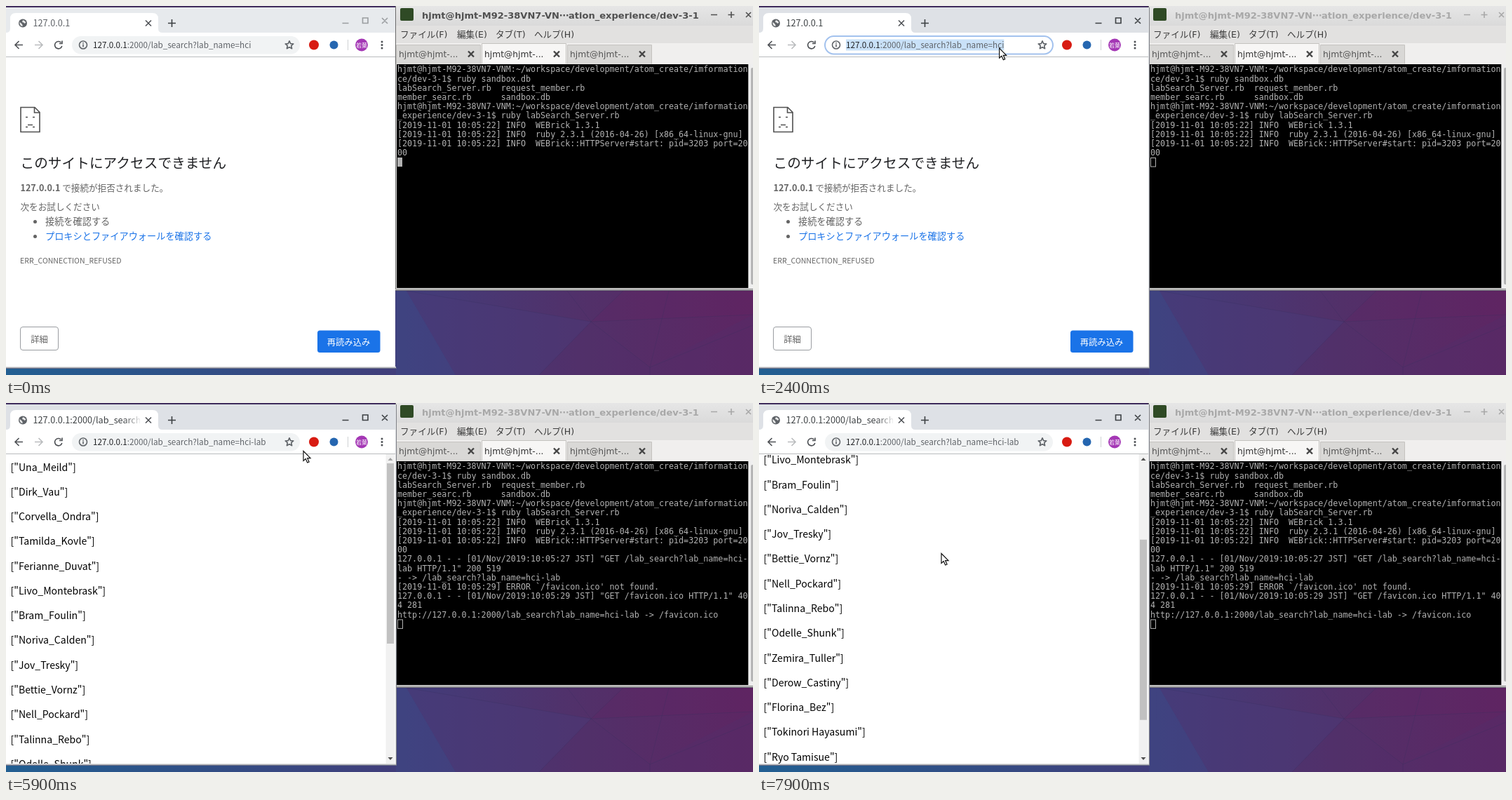
Recreate the animation shown at these times as an HTML page. Size 1065x526 px, loop 8000 ms.

```html
<!DOCTYPE html>
<html lang="ja">
<head>
<meta charset="utf-8">
<title>Lab search</title>
<style>
  html, body { margin: 0; width: 100%; height: 100%; overflow: hidden; }
  svg { display: block; width: 100vw; height: 100vh; }
  text { white-space: pre; }
  .ui { font-family: "Noto Sans CJK JP", "Noto Sans", sans-serif; }
  .gtk { font: 12.6px "DejaVu Sans", "Noto Sans CJK JP", sans-serif; }
  .mono { font: 11.7px "DejaVu Sans Mono", monospace; fill: #b2b2b2; }
  .url { font-size: 11.73px; fill: #5f6368; }
  .host { fill: #202124; }
  .list { font-size: 14.08px; fill: #000; }
  .line { fill: none; stroke-width: 1.6; }
  .mid { text-anchor: middle; }
</style>
</head>
<body>
<svg viewBox="0 0 1065 526" preserveAspectRatio="none">
  <defs>
    <linearGradient id="sky">
      <stop offset="0" stop-color="#225f92"/><stop offset=".25" stop-color="#304f86"/>
      <stop offset=".55" stop-color="#433c79"/><stop offset=".78" stop-color="#523069"/>
      <stop offset="1" stop-color="#5d2663"/>
    </linearGradient>
    <linearGradient id="titleBar" x2="0" y2="1">
      <stop offset="0" stop-color="#e6e6e6"/><stop offset="1" stop-color="#dadada"/>
    </linearGradient>
    <linearGradient id="fade">
      <stop offset="0" stop-color="#fff" stop-opacity="0"/><stop offset="1" stop-color="#fff"/>
    </linearGradient>
    <filter id="shadow" x="-10%" y="-10%" width="120%" height="140%">
      <feDropShadow dx="0" dy="3" stdDeviation="4" flood-opacity=".35"/>
    </filter>
    <clipPath id="pageClip"><rect y="73" width="541" height="441"/></clipPath>
    <clipPath id="tabClip"><rect x="38" y="12" width="153" height="24"/></clipPath>
    <g id="globe">
      <circle r="6" fill="#5f6368"/>
      <path d="M-4.5-1.5Q-2 0-1 1.5T-.5 4.6Q-4 4-4.6 0ZM0-4.6Q3-4 4.4-1L2.5.5 1-1-1-1.5Z" fill="#fff" opacity=".85"/>
    </g>
    <path id="cross" d="M-4-4L4 4M4-4L-4 4"/>
  </defs>

  <g id="desktop">
    <rect width="1065" height="526" fill="url(#sky)"/>
    <rect width="1065" height="2" fill="#42305f"/>
    <path d="M556 406H571L641 526H556Z" fill="#3c4a88" opacity=".45"/>
    <path d="M571 406L641 526H760L834 450Z" fill="#4b3a78" opacity=".5"/>
    <path d="M834 450L880 406H1065V440Z" fill="#65235f" opacity=".25"/>
    <path d="M834 450L918 515 1065 440V526H760Z" fill="#512f6c" opacity=".3"/>
    <path d="M571 406L834 450 1065 440M834 450L760 526M834 450L918 515 1065 455M834 450L880 406M918 515L945 406M834 450L800 406M918 515V526" class="line" style="stroke:#38305f;stroke-width:1;opacity:.28"/>
  </g>

  <g id="terminal" class="gtk">
    <rect x="555" width="510" height="406" fill="#e9e8e7"/>
    <rect x="555" width="510" height="28" fill="url(#titleBar)"/>
    <rect x="555" y="28" width="510" height="25" fill="#e2e1e0"/>
    <rect x="562" y="3" width="19" height="18" rx="2" fill="#2f4a25"/>
    <g id="termTitle">
      <text x="593" y="17.5" style="font-weight:bold;font-size:13.05px">hjmt@hjmt-M92-38VN7-VN⋯ation_experience/dev-3-1</text>
      <path d="M1005 12.500h9M1029.500 12.500h9M1034 8v9M1055 9l7 7m0-7l-7 7" fill="none" stroke="currentColor" stroke-width="1.6"/>
    </g>
    <g fill="#3c3c3c">
      <text x="562" y="44.500">ファイル(F)</text><text x="643" y="44.500">編集(E)</text>
      <text x="698" y="44.500">タブ(T)</text><text x="753" y="44.500">ヘルプ(H)</text>
    </g>
    <rect x="555" y="53" width="510" height="30" fill="#f0efee"/>
    <g id="termTabs"></g>
    <rect x="557" y="83" width="501.500" height="319" fill="#000"/>
    <path d="M555.500 0V406" stroke="#6a6a6a"/>
    <path d="M555 403.500H1065M577.500 403V406" stroke="#8a8a8a"/>
    <path d="M555 404.500H1065" stroke="#cfcfcf"/>
    <path d="M555 405.500H1065" stroke="#5c5a66"/>
    <rect x="1058.500" y="83" width="6.500" height="319" fill="#efefef"/>
    <rect x="1062" y="88" width="4" height="309" rx="2" fill="#b5b5b5"/>
    <g id="log" class="mono"></g>
    <rect id="block" width="7"/>
  </g>

  <g id="browser" class="ui">
    <rect y="2" width="555" height="515" fill="#fff"/>
    <rect id="strip" y="2" width="555" height="36"/>
    <g id="edge">
      <path d="M555.500 2V516" stroke="#e4e6e8"/><path d="M556.500 2V516" stroke="#7d7f86"/>
    </g>
    <path d="M0 514.500H556" stroke="#dcdddf"/>
    <path d="M0 515.500H556" stroke="#b4b6bb"/><path d="M0 516.500H557" stroke="#6c6f86"/>
    <path d="M0 38Q6 38 6 32V18Q6 10 14 10H209Q217 10 217 18V32Q217 38 223 38Z" fill="#fff"/>
    <use href="#globe" x="24" y="24.500"/>
    <g clip-path="url(#tabClip)">
      <text id="tabTitle" x="38.500" y="28.800" font-size="12.700"></text>
      <rect x="168" y="12" width="26" height="24" fill="url(#fade)"/>
    </g>
    <use href="#cross" x="203" y="24.500" stroke="#4a4d51" stroke-width="1.500"/>
    <path d="M231 24.500h11M236.500 19v11" class="line" stroke="#3c4043"/>
    <path id="winButtons" d="M479.500 24.500h9M508.500 17h7.500v7.500h-7.500zM536 17l8 8m0-8l-8 8" class="line"/>

    <g class="line" stroke="#4d5054">
      <path d="M24 55.500H13.500M18.500 50l-5.500 5.500 5.500 5.500"/>
      <path d="M41 55.500H51.500M46.500 50l5.500 5.500-5.500 5.500" stroke="#babcbe"/>
      <path d="M78.500 52A5.200 5.200 0 1 0 79.800 57M80 49.500V53.500H76"/>
    </g>
    <rect id="bar" x="94" y="43" width="325" height="25.500" rx="12.700"/>
    <g class="line" stroke="#5f6368" stroke-width="1.200">
      <circle cx="110" cy="55.500" r="5.500"/><path d="M110 54.500V58.500M110 52V53.500"/>
      <path stroke-linejoin="round" d="M404 49.800l1.700 3.800 4.100.4-3.100 2.700.9 4-3.600-2.100-3.600 2.100.9-4-3.100-2.700 4.100-.4z"/>
    </g>
    <circle cx="439" cy="55.500" r="7" fill="#d81b12"/>
    <circle cx="467.500" cy="55.500" r="6" fill="#2566b0"/>
    <path d="M487.500 48v15" stroke="#cfd1d4"/>
    <circle cx="507" cy="55.500" r="9" fill="#a437b5"/>
    <text x="507" y="58.500" class="mid" font-size="8" fill="#fff">若葉</text>
    <g fill="#4d5054"><circle cx="536" cy="51" r="1.500"/><circle cx="536" cy="55.500" r="1.500"/><circle cx="536" cy="60" r="1.500"/></g>
    <path d="M0 72.500H555" stroke="#b9bbbd"/>

    <g id="errorPage" fill="#646464" font-size="12.600">
      <g class="line" stroke="#505050" stroke-width="2.400">
        <path d="M21 144.500H41L48 151.500V179.500H21ZM40.500 145V152H48"/>
        <path d="M28 158.500h3M38 158.500h3M28 172.500h3M31 169.500h7M38 172.500h3"/>
      </g>
      <text x="20.500" y="230.500" font-size="19.700" font-weight="500" fill="#202124">このサイトにアクセスできません</text>
      <text x="20.500" y="264"><tspan font-weight="bold">127.0.0.1</tspan> で接続が拒否されました。</text>
      <text x="20.500" y="291">次をお試しください</text>
      <circle cx="41.500" cy="307.500" r="2.500"/><circle cx="41.500" cy="328.500" r="2.500"/>
      <text x="56" y="312" font-size="13.200">接続を確認する</text>
      <text x="56" y="333" font-size="13.200" fill="#1a73e8">プロキシとファイアウォールを確認する</text>
      <text x="20" y="366.500" font-size="10.560">ERR_CONNECTION_REFUSED</text>
      <rect x="20.500" y="457.500" width="54" height="33" rx="3.500" fill="#fff" stroke="#9a9da1"/>
      <text x="47.500" y="479.800" class="mid" font-size="12.300">詳細</text>
      <rect x="444" y="462.500" width="89.500" height="31.500" rx="3.500" fill="#1a73e8"/>
      <text x="488.500" y="484" class="mid" font-size="12.300" fill="#fff">再読み込み</text>
    </g>

    <g id="results">
      <g clip-path="url(#pageClip)"><g id="members" class="list"></g></g>
      <rect x="541.500" y="73" width="13" height="441" fill="#f1f1f1"/>
      <rect id="thumb" x="543" y="86" width="10" height="257" fill="#c1c1c1"/>
      <path id="upArrow" d="M544.500 82l3.500-4 3.500 4z"/>
      <path d="M544.500 505l3.500 4 3.500-4z" fill="#505050"/>
    </g>

    <g id="dropdown">
      <rect x="89" y="40" width="336" height="95" rx="7" fill="#fff" filter="url(#shadow)"/>
      <rect x="89" y="71" width="336" height="32" fill="#dadada"/>
      <use href="#globe" x="110" y="55.500"/><use href="#globe" x="110" y="87"/>
      <circle cx="109" cy="117.500" r="3.500" class="line" stroke="#5f6368"/>
      <path d="M111.500 120l4 4" class="line" stroke="#5f6368"/>
      <text x="134" y="91.300" class="url host">Internal Server Error <tspan fill="#5f6368">- </tspan><tspan fill="#1a6fe0" font-weight="bold">127.0.0.1:2000/lab_search…</tspan></text>
      <text id="query" x="134" y="123.300" class="url host"></text>
    </g>
    <rect id="selection" y="47.500" height="16" fill="#c9e1f8"/>
    <text id="url" y="59.700" class="url"><tspan class="host">127.0.0.1</tspan><tspan id="urlRest"></tspan></text>
    <rect id="caret" y="48" width="1" height="15" fill="#222"/>
  </g>

  <path id="arrow" d="M0 .500V14.500L3.200 11.600 5.700 17 8.100 16 5.700 10.700H10Z" fill="#fff" stroke="#111" stroke-width="1.200"/>
  <path id="beam" d="M-3.500-7.500H-1Q0-7.500 0-6.500 0-7.500 1-7.500H3.500M0-6.500V6.500M-3.500 7.500H-1Q0 7.500 0 6.500 0 7.500 1 7.500H3.500M-2 2H2" fill="none" stroke="#111" stroke-width="1.400"/>
</svg>
<script>
const LOOP = 8000, STEP = 100;
const FOCUS = 2000, TYPE_START = 3600, OPEN = 4300, REQUEST = 4600, TYPED = 4800, LOADED = 5900;
const ROW = 13.2, MEMBER_GAP = 35.27;
const HOST = "127.0.0.1", PATH = ":2000/lab_search?lab_name=hci";

const $ = id => document.getElementById(id);
const show = (id, on) => $(id).style.display = on ? "" : "none";
const set = (id, attrs) => Object.entries(attrs).forEach(([k, v]) => $(id).setAttribute(k, v));
const write = (id, text) => { if ($(id).textContent !== text) $(id).textContent = text; };

const prompt = "hjmt@hjmt-M92-38VN7-VNM:~/workspace/development/atom_create/imformation";
const stamp = "[2019-11-01 10:05:22] INFO  ";
const log = [
  prompt, "ce/dev-3-1$ ruby sandbox.db",
  "labSearch_Server.rb  request_member.rb", "member_searc.rb      sandbox.db",
  prompt, "_experience/dev-3-1$ ruby labSearch_Server.rb",
  stamp + "WEBrick 1.3.1", stamp + "ruby 2.3.1 (2016-04-26) [x86_64-linux-gnu]",
  stamp + "WEBrick::HTTPServer#start: pid=3203 port=20", "00",
  '127.0.0.1 - - [01/Nov/2019:10:05:27 JST] "GET /lab_search?lab_name=hci-',
  'lab HTTP/1.1" 200 519', "- -> /lab_search?lab_name=hci-lab",
  "[2019-11-01 10:05:29] ERROR `/favicon.ico' not found.",
  '127.0.0.1 - - [01/Nov/2019:10:05:29 JST] "GET /favicon.ico HTTP/1.1" 40',
  "4 281", "http://127.0.0.1:2000/lab_search?lab_name=hci-lab -> /favicon.ico"
];
$("log").innerHTML = log.map((s, i) =>
  `<text x="558" y="${94.4 + ROW * i}">${s.replace(/>/g, "&gt;")}</text>`).join("");

const members = ["Una_Meild", "Dirk_Vau", "Corvella_Ondra", "Tamilda_Kovle", "Ferianne_Duvat",
  "Livo_Montebrask", "Bram_Foulin", "Noriva_Calden", "Jov_Tresky", "Bettie_Vornz", "Nell_Pockard",
  "Talinna_Rebo", "Odelle_Shunk", "Zemira_Tuller", "Derow_Castiny", "Florina_Bez",
  "Tokinori Hayasumi", "Ryo Tamisue"];
$("members").innerHTML = members.map((name, i) =>
  `<text x="6.500" y="${96.6 + MEMBER_GAP * i}">["${name}"]</text>`).join("");

$("termTabs").innerHTML = [0, 1, 2].map(i => {
  const x = 556.5 + 122 * i, front = i === 1;
  return `<path d="M${x} 82.500V${front ? 53.5 : 55.5}H${x + 120}V82.500" fill="${front ? "#f7f6f5" : "#d9d8d6"}" stroke="#c4c2bf"/>
    <text x="${x + 3.5}" y="72.700" style="font-size:12.3px" fill="${front ? "#333" : "#555"}">hjmt@hjmt-...</text>
    <use href="#cross" x="${x + 106.5}" y="68.500" stroke="#444" stroke-width="2.400"/>`;
}).join("");

// Pointer keys: time, x, y
const pointerPath = [[600, 106, 490], [1400, 390, 45], [1800, 288, 61], [2000, 300, 61],
  [2300, 335, 57], [2600, 358, 65], [3500, 358, 65], [3700, 424, 68], [6300, 424, 68],
  [6400, 356, 85], [6700, 356, 85], [6800, 460, 239], [7000, 340, 109], [7200, 260, 214], [LOOP, 260, 214]];

function pointerAt(t) {
  const i = Math.max(1, pointerPath.findIndex(k => k[0] >= t));
  const [t0, x0, y0] = pointerPath[i - 1], [t1, x1, y1] = pointerPath[i];
  const p = (t - t0) / (t1 - t0);
  return [x0 + (x1 - x0) * p, y0 + (y1 - y0) * p];
}

function drawPointer(t) {
  const visible = t >= 600 && !(t >= 6600 && t < 6800);
  const [x, y] = pointerAt(t);
  const overBar = t <= FOCUS && y > 43 && y < 69 && x > 94 && x < 419;
  show("arrow", visible && !overBar);
  show("beam", visible && overBar);
  set(overBar ? "beam" : "arrow", { transform: `translate(${x} ${y})` });
}

function drawAddress(t) {
  const open = t >= OPEN && t < LOADED;
  const focused = t >= FOCUS && t < LOADED;
  const x = open ? 134 : 124;
  const rest = PATH + (t >= OPEN ? "-lab" : "");
  set("bar", { fill: focused ? "#fff" : "#f1f3f4", stroke: focused ? "#a3c2ee" : "none", "stroke-width": 2 });
  show("dropdown", open);
  set("url", { x });
  write("urlRest", rest);

  const total = (HOST + rest).length;
  const untyped = t < REQUEST ? 3 : t < TYPED ? 1 : 0;
  const selectFrom = t >= FOCUS && t < TYPE_START ? 0 : open ? total - untyped : total;
  const offset = n => n ? $("url").getSubStringLength(0, n) : 0;
  const start = offset(selectFrom), end = offset(total);
  show("selection", end > start);
  set("selection", { x: x + start, width: Math.max(0, end - start) });
  write("query", (HOST + rest).slice(0, total - untyped));
  show("caret", (t >= TYPE_START && t < OPEN) || (t >= TYPED && t < 5300));
  set("caret", { x: x + end });
}

function drawPage(t) {
  const loaded = t >= LOADED;
  show("errorPage", !loaded);
  show("results", loaded);
  write("tabTitle", HOST + (loaded ? ":2000/lab_search?lab_name=hci-lab" : ""));
  const scroll = t < 7600 ? 0 : 93.3 + 93.3 * Math.min(1, (t - 7600) / 300);
  set("members", { transform: `translate(0 ${-scroll})` });
  set("thumb", { y: 86 + scroll * 0.583 });
  set("upArrow", { fill: scroll ? "#505050" : "#a3a3a3" });
}

function drawFocus(t) {
  const active = t >= FOCUS;
  set("strip", { fill: active ? "#dee1e6" : "#e7eaed" });
  set("winButtons", { stroke: active ? "#3c4043" : "#9a9da0" });
  set("tabTitle", { fill: active ? "#3c4043" : "#5f6368" });
  show("edge", active);
  const title = active ? "#a8a8a8" : "#505050";
  set("termTitle", { fill: title, color: title });

  const rows = t < REQUEST ? 10 : t < LOADED ? 13 : log.length;
  [...$("log").children].forEach((row, i) => row.style.display = i < rows ? "" : "none");
  set("block", active
    ? { x: 558.5, y: 84.5 + ROW * rows, height: 12.5, fill: "none", stroke: "#b2b2b2" }
    : { x: 558, y: 84 + ROW * rows, height: 13, fill: "#b2b2b2", stroke: "none" });
}

const begin = performance.now();
function frame() {
  const t = Math.floor((performance.now() - begin) % LOOP / STEP) * STEP;
  drawFocus(t);
  drawPage(t);
  drawAddress(t);
  drawPointer(t);
  requestAnimationFrame(frame);
}
frame();
</script>
</body>
</html>
```
